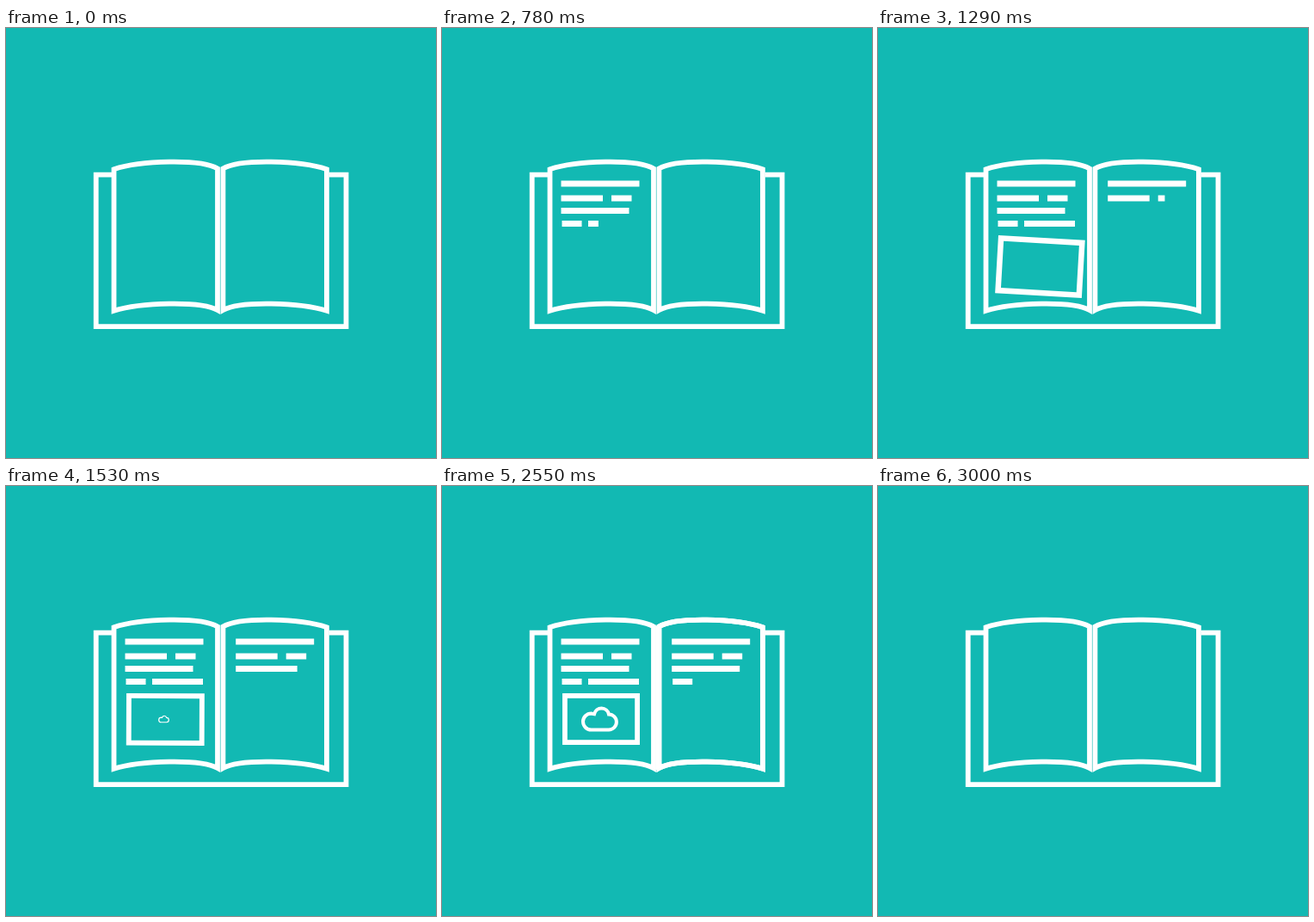
An HTML page with a canvas for the animation above (3.63 s loop, 500 by 500 pixels).

```html
<!DOCTYPE html>
<html lang="en">
<head>
<meta charset="utf-8">
<title>Open book</title>
<style>
  html, body { margin: 0; width: 100%; height: 100%; overflow: hidden; background: #12b9b3; }
  canvas { display: block; }
</style>
</head>
<body>
<canvas id="stage" width="500" height="500"></canvas>
<script>
const ctx = document.getElementById('stage').getContext('2d');
const LOOP = 3630, STEP = 30;
const SPINE = 249.2, PAGE_WIDTH = 126.6, PEN = 5.8;
const WRITE_START = 18, ROW_TIME = 219;
const TURN_START = 2550, TURN_END = 3000;

const cover = new Path2D('M123 170.7H104.7V347.2H395.5V170.7H375.5');
const page = new Path2D('M125.5 164.3C156 154 227 152 246 163.5V328C227 317 156 319 125.5 328.8Z');
const cloud = new Path2D('M173.5 283.5A9.5 9.5 0 0 1 173.5 264.5L177 265.2' +
  'A8.7 8.7 0 0 1 194 265.5A9 9 0 0 1 193.8 283.5Z');

// Rows of writing, shared by both pages: top, then bars as [offset, width]
const rows = [
  [177.5, [0, 91]],
  [194.5, [0, 48.5], [58.5, 23.5]],
  [209, [0, 79]],
  [224, [1, 23], [31.5, 59]]
];

const progress = (t, start, end) => Math.min(1, Math.max(0, (t - start) / (end - start)));
const easeOut = u => 1 - (1 - u) ** 3;

function strokeAt(path, width) {
  ctx.lineWidth = width;
  ctx.stroke(path);
}

// Draws with the scale centred on a fixed point
function scaled(x, y, scaleX, scaleY, paint) {
  ctx.save();
  ctx.translate(x, y);
  ctx.scale(scaleX, scaleY);
  ctx.translate(-x, -y);
  paint();
  ctx.restore();
}

const drawPage = fold => scaled(SPINE, 0, fold, 1, () => strokeAt(page, PEN));

function drawWriting(t) {
  for (let i = 0; i < 8; i++) {
    const [top, ...bars] = rows[i % 4];
    // The last row stops after its first bar
    const shown = i < 7 ? bars : bars.slice(0, 1);
    const left = i < 4 ? 138.5 : 267.2;
    const [lastOffset, lastWidth] = shown.at(-1);
    const start = WRITE_START + i * ROW_TIME;
    const tip = (lastOffset + lastWidth) * progress(t, start, start + ROW_TIME);
    for (const [offset, width] of shown) {
      ctx.fillRect(left + offset, top, Math.max(0, Math.min(width, tip - offset)), 7);
    }
  }
}

function drawPicture(t) {
  const grow = progress(t, 900, 1300);
  const settle = 1 - easeOut(progress(t, 1300, 1680));
  const size = grow * (1 + 0.15 * settle);
  ctx.save();
  ctx.translate(140, 241);
  ctx.rotate(3.4 * Math.PI / 180 * grow * settle);
  ctx.scale(size, size);
  ctx.lineWidth = PEN;
  if (grow) ctx.strokeRect(2.9, 2.9, 84.2, 54.2);
  ctx.restore();

  const pop = easeOut(progress(t, 1500, 1770));
  if (pop) scaled(183.5, 271, pop, pop, () => strokeAt(cloud, 4));
}

function draw(t) {
  ctx.fillStyle = '#12b9b3';
  ctx.fillRect(0, 0, 500, 500);
  ctx.fillStyle = ctx.strokeStyle = '#fff';

  strokeAt(cover, PEN);
  drawPage(1);
  drawPage(-1);
  if (t >= TURN_END) return;

  // The turning page wipes the writing away
  const fold = 1 - 2 * progress(t, TURN_START, TURN_END);
  ctx.save();
  ctx.beginPath();
  ctx.rect(0, 0, t <= TURN_START ? 500 : SPINE + Math.min(0, fold) * PAGE_WIDTH, 500);
  ctx.clip();
  drawWriting(t);
  drawPicture(t);
  ctx.restore();

  if (t >= TURN_START) {
    ctx.fillRect(SPINE - 1, 163, 2, 167);
    drawPage(-fold);
  }
}

function tick() {
  draw(Math.floor(performance.now() % LOOP / STEP) * STEP);
  requestAnimationFrame(tick);
}
tick();
</script>
</body>
</html>
```
